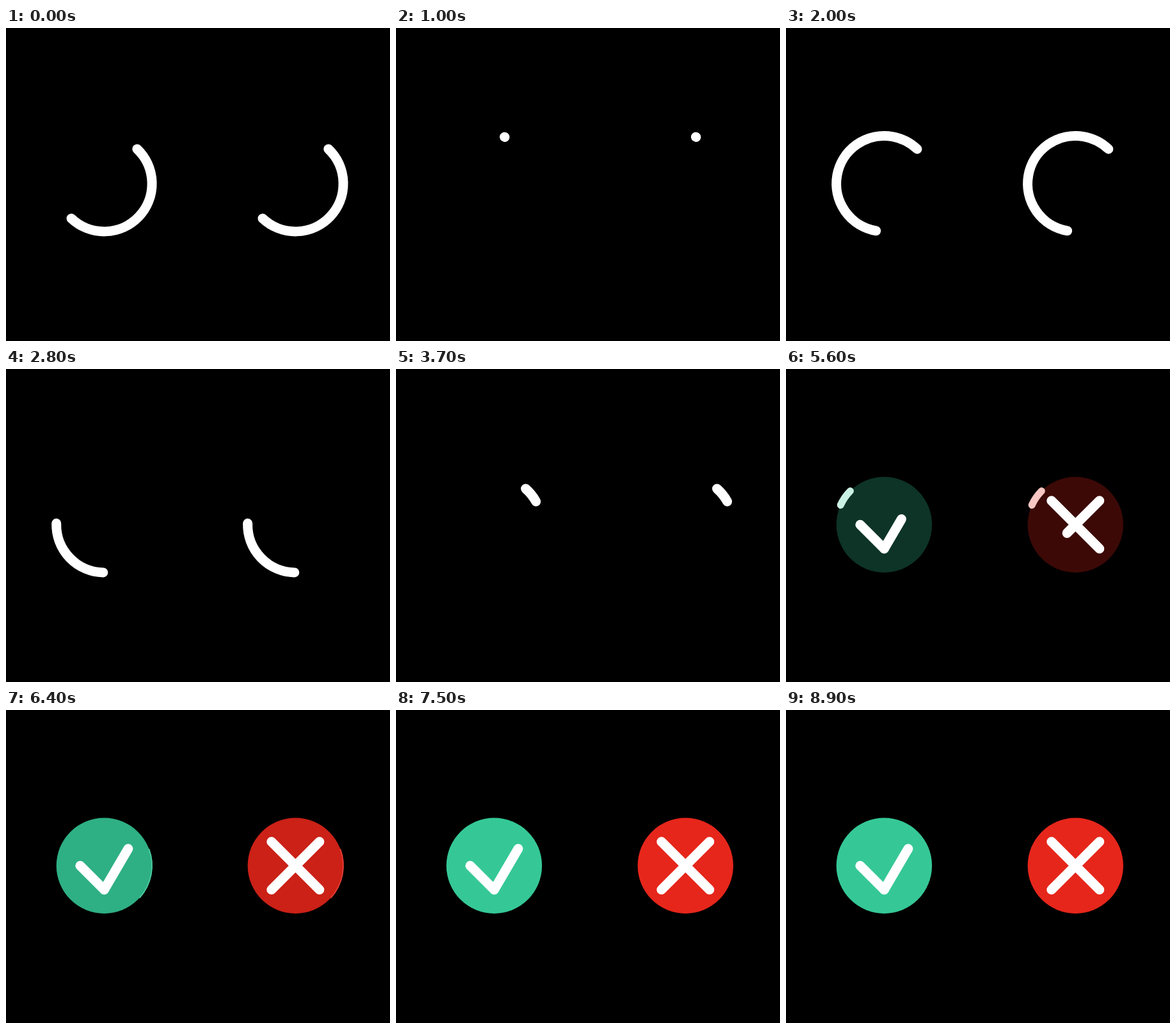
These frames come from a looping animation (600 px wide and 489 px high, 9000 ms). An HTML page with a canvas:

```html
<!DOCTYPE html>
<html lang="en">
<head>
<meta charset="utf-8">
<title>Loading, success and failure</title>
<style>
  html, body { margin: 0; height: 100%; overflow: hidden; background: #000; }
  canvas { display: block; }
</style>
</head>
<body>
<canvas id="stage" width="600" height="489"></canvas>
<script>
const ctx = document.getElementById('stage').getContext('2d');
const LOOP = 9000, STEP = 100, SPIN = 2500;
const RADIUS = 74.7, WIDTH = 15, CY = 243.2;
const ORIGIN = -48.8; // angle of the ring's seam, in degrees

// Segments are x1, y1, x2, y2 relative to the badge centre.
const badges = [
  { x: 153.4, rgb: [53, 200, 150], mark: [[-37.5, 0, 0, 37.5], [0, 37.5, 37.5, -26.5]] },
  { x: 452.3, rgb: [230, 38, 27], mark: [[-37.5, -37.5, 37.5, 37.5], [37.5, -37.5, -37.5, 37.5]] }
];

// Eased progress from 0 to 1, starting at `start` and lasting `length` ms
function ease(t, start, length) {
  const x = Math.min(1, Math.max(0, (t - start) / length));
  return x * x * (3 - 2 * x);
}

function drawRing(t, fade, rgb) {
  const phase = (t + 1535) % SPIN;
  const tail = ease(phase, 725, 1650), head = ease(phase, 0, 1650);
  if (head - tail < 0.0005 || fade >= 1) return;
  const turn = (phase - 235) / SPIN;
  const angle = trim => (ORIGIN + 360 * (turn + trim)) * Math.PI / 180;
  ctx.strokeStyle = `rgb(${rgb.map(c => Math.round(255 + (c - 255) * fade))})`;
  ctx.lineWidth = WIDTH * (1 - fade);
  ctx.beginPath();
  ctx.arc(0, 0, RADIUS, angle(tail), angle(head));
  ctx.stroke();
}

function drawMark(segments, progress) {
  const lengths = segments.map(([x1, y1, x2, y2]) => Math.hypot(x2 - x1, y2 - y1));
  let left = progress * lengths.reduce((a, b) => a + b);
  ctx.strokeStyle = '#fff';
  ctx.lineWidth = WIDTH;
  segments.forEach(([x1, y1, x2, y2], i) => {
    if (left <= 0) return;
    const k = Math.min(1, left / lengths[i]);
    ctx.beginPath();
    ctx.moveTo(x1, y1);
    ctx.lineTo(x1 + (x2 - x1) * k, y1 + (y2 - y1) * k);
    ctx.stroke();
    left -= lengths[i];
  });
}

function draw(t) {
  const fade = ease(t, 5010, 1766);
  const progress = ease(t, 4896, 945);
  ctx.fillStyle = '#000';
  ctx.fillRect(0, 0, 600, 489);
  ctx.lineCap = 'round';
  for (const { x, rgb, mark } of badges) {
    ctx.save();
    ctx.translate(x, CY);
    ctx.fillStyle = `rgba(${rgb}, ${fade})`;
    ctx.beginPath();
    ctx.arc(0, 0, RADIUS, 0, 2 * Math.PI);
    ctx.fill();
    drawRing(t, fade, rgb);
    drawMark(mark, progress);
    ctx.restore();
  }
}

// Ten pictures a second; the small lead absorbs timer jitter.
function tick() {
  draw(Math.floor((performance.now() + 15) / STEP) * STEP % LOOP);
  requestAnimationFrame(tick);
}
tick();
</script>
</body>
</html>
```
